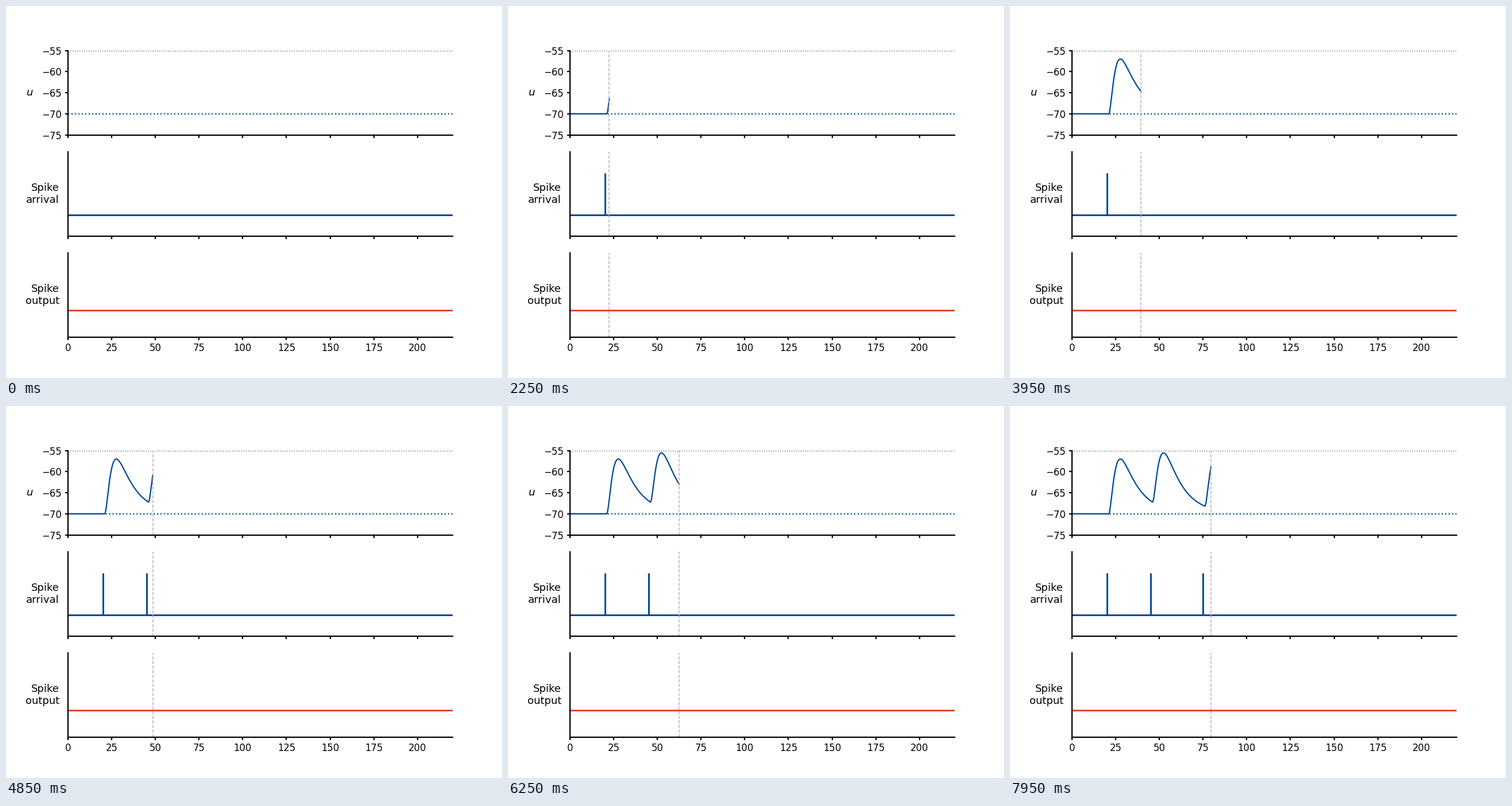
A matplotlib script that plays this animation: 864x648 px, repeating every 8000 ms.

```python
import numpy as np
import matplotlib.pyplot as plt
from matplotlib.animation import FuncAnimation

W, H, DPI = 864, 648, 108
FRAMES, INTERVAL = 160, 50
STEP = 0.5                      # simulated ms per frame
T_MAX = 220
BLUE, RED = "#004b97", "#e24a33"

U_REST, THRESHOLD = -70, -55
TAU_M, TAU_S, GAIN, DELAY = 10.0, 2.0, 34.0, 1.0
ARRIVALS = [20, 45, 75]

plt.rcParams.update({
    "font.family": "DejaVu Sans",
    "mathtext.fontset": "dejavusans",
    "axes.linewidth": 1.5,
    "xtick.major.width": 1.5,
    "ytick.major.width": 1.5,
    "xtick.labelsize": 11,
    "ytick.labelsize": 11,
})


def response(s):
    """Membrane response to one alpha-shaped input current."""
    s = np.maximum(s, 0)
    k = 1 / TAU_S - 1 / TAU_M
    return GAIN * np.exp(-s / TAU_M) * (1 - (1 + k * s) * np.exp(-k * s))


def potential(t):
    return U_REST + sum(response(t - a - DELAY) for a in ARRIVALS)


fig, axes = plt.subplots(3, 1, sharex=True, figsize=(W / DPI, H / DPI), dpi=DPI)
fig.subplots_adjust(left=0.125, right=0.9, bottom=0.11, top=0.88, hspace=0.2)
ax_u, ax_in, ax_out = axes


def side_label(ax, text, x):
    box = ax.get_position()
    fig.text(x / W, (box.y0 + box.y1) / 2, text, fontsize=12,
             ha="right", va="center")


for ax in axes:
    ax.spines[["top", "right"]].set_visible(False)
    ax.set_xlim(0, T_MAX)
    ax.set_xticks(range(0, 201, 25))

ax_u.set_ylim(-75, -55)
ax_u.set_yticks(range(-75, -54, 5))
ax_u.axhline(THRESHOLD, color="black", lw=1, ls=":")
ax_u.axhline(U_REST, color=BLUE, lw=1.5, ls=":")
trace, = ax_u.plot([], [], color=BLUE, lw=1.5)

ax_in.set_ylim(-0.5, 1.5)
ax_in.set_yticks([])
ax_in.axhline(0, color=BLUE, lw=2)
spikes, = ax_in.plot([], [], color=BLUE, lw=2, solid_capstyle="butt")

ax_out.set_ylim(-0.35, 0.75)
ax_out.set_yticks([])
ax_out.axhline(0, color=RED, lw=2)

side_label(ax_u, "$u$", 47.7)
side_label(ax_in, "Spike\narrival", 93)
side_label(ax_out, "Spike\noutput", 93)

cursors = [ax.axvline(0, color="0.7", lw=1, ls="--") for ax in axes]


def draw(frame):
    now = frame * STEP
    t = np.linspace(0, now, frame * 5 + 1)
    trace.set_data(t, potential(t))

    seen = [a for a in ARRIVALS if a <= now]
    spikes.set_data(np.repeat(seen, 3), np.tile([0, 1, np.nan], len(seen)))

    for cursor in cursors:
        cursor.set_xdata([now, now])
    return [trace, spikes, *cursors]


anim = FuncAnimation(fig, draw, frames=FRAMES, interval=INTERVAL,
                     init_func=lambda: draw(0), repeat=True, repeat_delay=0)
plt.show()
```
